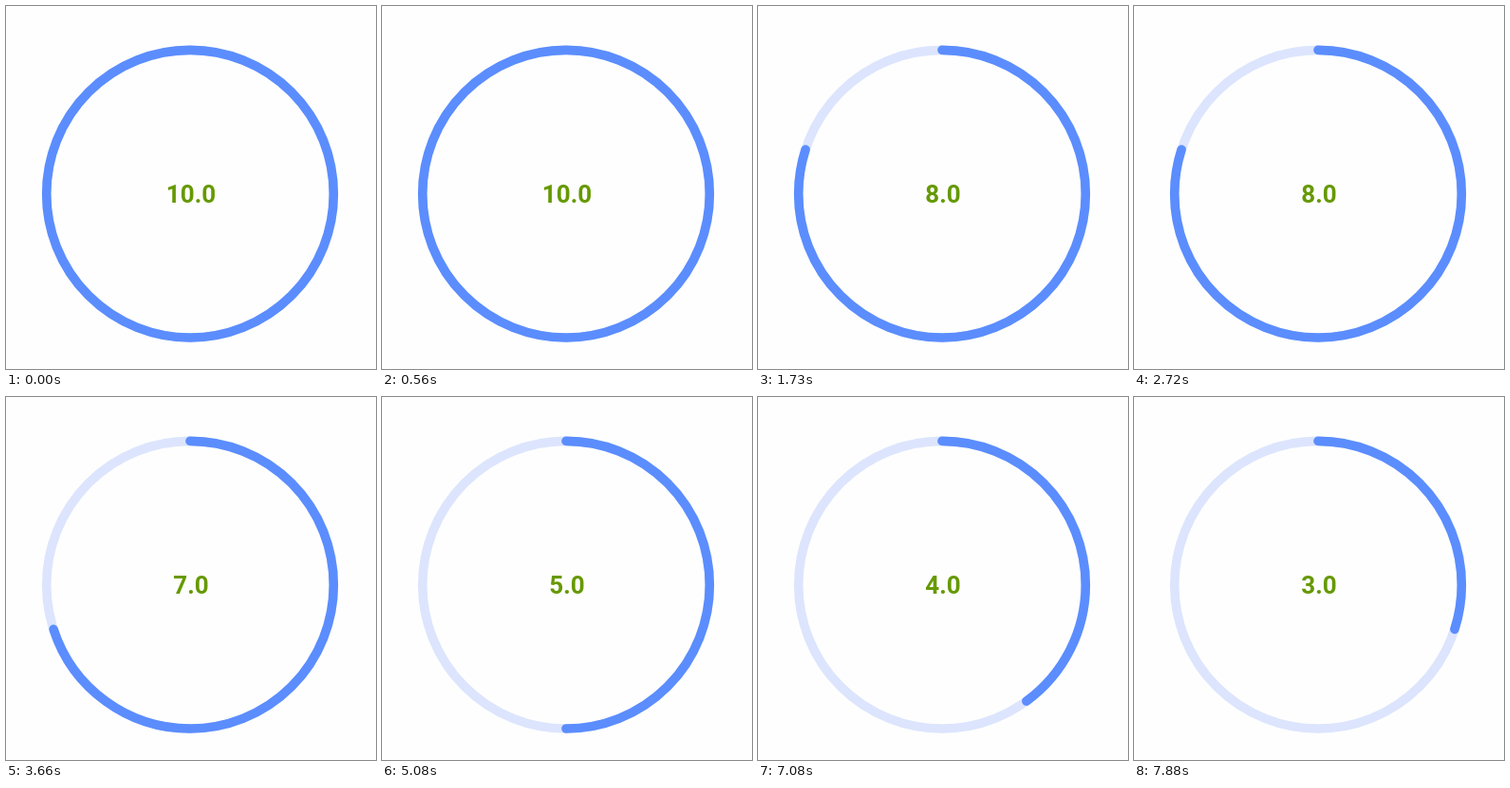
Recreate the animation shown at these times as an HTML page. Size 390x382 px, loop 8000 ms.

```html
<!DOCTYPE html>
<html lang="en">
<head>
<meta charset="utf-8">
<title>Countdown ring</title>
<style>
  html, body { margin: 0; width: 100%; height: 100%; overflow: hidden; background: #fefefe; }
  svg { display: block; width: 390px; height: 382px; }
  circle { fill: none; stroke-width: 9.6; }
  .track { stroke: #dce5fd; }
  .bar { stroke: #5b8dfe; stroke-linecap: round; }
  text { font: 700 26px Roboto, sans-serif; fill: #669900; text-anchor: middle; }
</style>
</head>
<body>
<svg viewBox="0 0 390 382">
  <circle class="track" cx="194" cy="197.7" r="151.3"/>
  <circle class="bar" cx="194" cy="197.7" r="151.3" transform="rotate(-90 194 197.7)" pathLength="100"/>
  <text x="195" y="206.5"></text>
</svg>
<script>
  const LOOP = 8000, START = 10;
  // Times at which the counter drops by one
  const ticks = [640, 1715, 2860, 3980, 5060, 6160, 7180];
  const bar = document.querySelector('.bar');
  const label = document.querySelector('text');
  let shown = null;

  function draw(now) {
    const t = now % LOOP;
    const value = START - ticks.filter(at => at <= t).length;
    if (value !== shown) {
      shown = value;
      label.textContent = value.toFixed(1);
      bar.setAttribute('stroke-dasharray', value === START ? 'none' : `${value * 100 / START} 200`);
    }
    requestAnimationFrame(draw);
  }
  draw(0);
</script>
</body>
</html>
```
